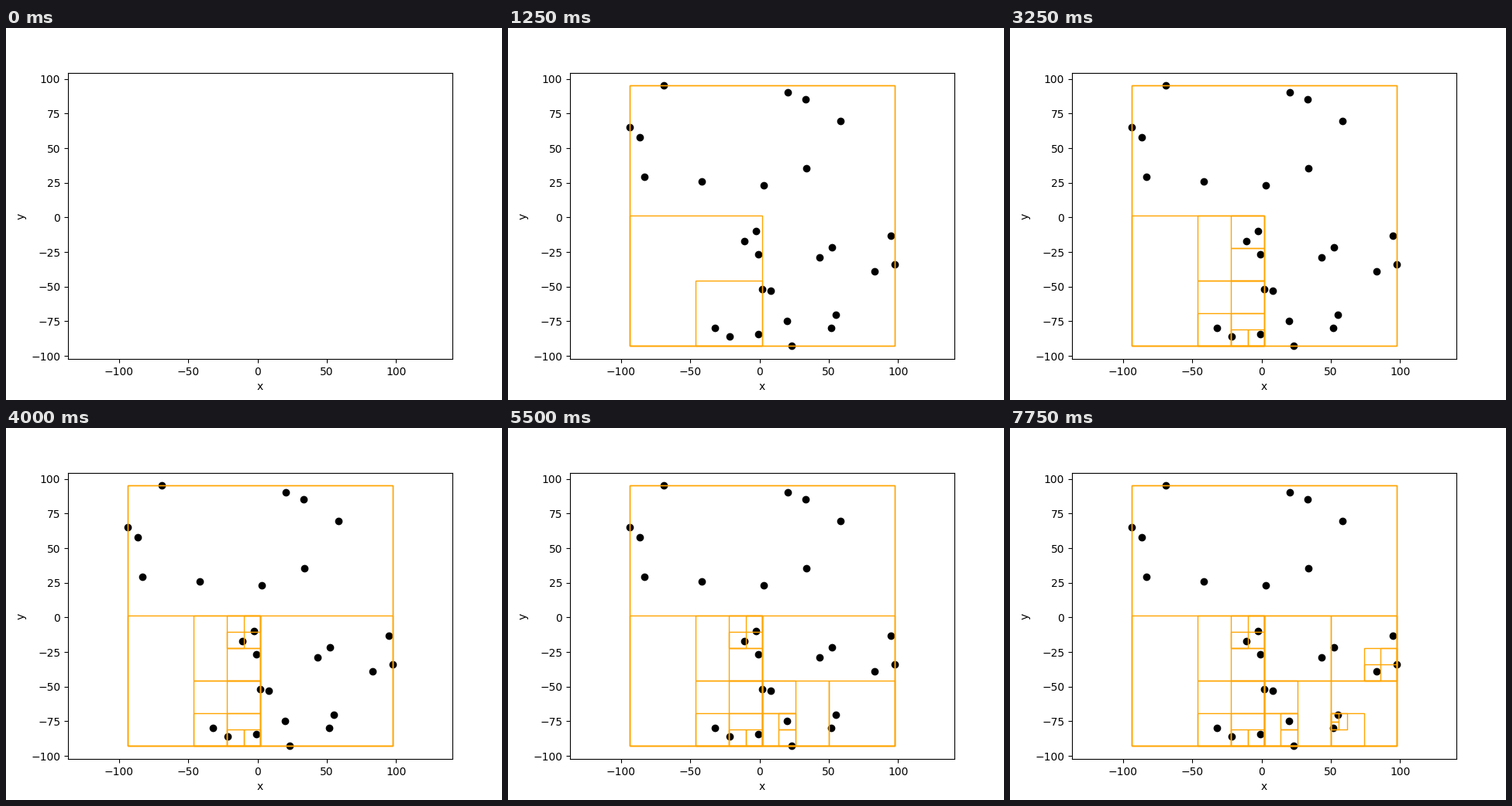
A matplotlib script for the animation above (8 s loop, 640 by 480 pixels).

```python
from itertools import islice

import matplotlib.pyplot as plt
import numpy as np
from matplotlib.animation import FuncAnimation
from matplotlib.patches import Rectangle

STEPS = 32

# The plotted data; cells, bounds and axis limits all follow from it.
POINTS = np.array([
    (-69, 95.12), (20.4, 90.3), (33.2, 85.3), (58.4, 69.6), (-94, 65),
    (-86.5, 58), (34, 35.5), (-83, 29.3), (-41.7, 26), (3, 23),
    (-2.6, -10), (-11, -17), (-1, -26.6), (95, -13.2), (52.3, -21.6),
    (43.3, -29), (97.8, -34), (83, -39), (1.8, -52), (8, -53),
    (20, -74.8), (55, -70.3), (51.7, -80), (-32, -80), (-21.5, -86),
    (-1, -84.3), (23, -92.88),
])


def quadtree(points, low, size):
    """Yield the non-empty cells depth first, lower row before upper row."""
    yield low, size
    if len(points) < 2:
        return
    half = size / 2
    upper = points > low + half
    for top in (False, True):
        for right in (False, True):
            side = np.array([right, top])
            inside = points[(upper == side).all(axis=1)]
            if len(inside):
                yield from quadtree(inside, low + side * half, half)


def add_box(low, size):
    return ax.add_patch(Rectangle(low, *size, fill=False,
                                  edgecolor="orange", linewidth=1))


fig, ax = plt.subplots(figsize=(6.4, 4.8), dpi=100)
ax.set(xlabel="x", ylabel="y")
ax.set_aspect("equal", adjustable="datalim")

dots, = ax.plot(*POINTS.T, "ko", zorder=0.9)

# The outer box is drawn twice: once as the bounds, once as the root cell.
low = POINTS.min(axis=0)
size = np.ptp(POINTS, axis=0)
boxes = [add_box(low, size)]
boxes += [add_box(*cell)
          for cell in islice(quadtree(POINTS, low, size), STEPS - 3)]


def update(step):
    dots.set_visible(step >= 1)
    for i, box in enumerate(boxes):
        box.set_visible(step >= i + 2)
    return [dots, *boxes]


anim = FuncAnimation(fig, update, frames=STEPS, interval=250,
                     repeat=True, repeat_delay=0)
plt.show()
```
